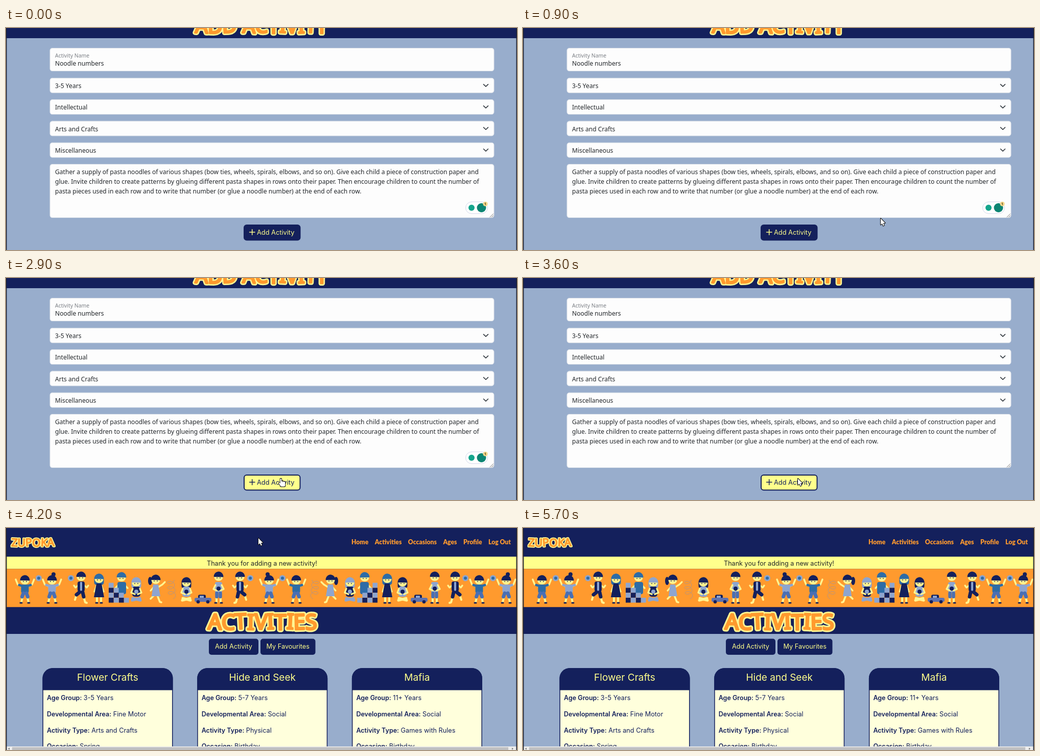
Write an HTML page with a canvas that moves like this. It is 1000 by 436 pixels and loops after 5.8 s.

```html
<!DOCTYPE html>
<html lang="en">
<head>
<meta charset="utf-8">
<title>Add activity</title>
<style>
  html, body { margin: 0; width: 100%; height: 100%; overflow: hidden; background: #98adcc; }
  canvas { display: block; width: 1000px; height: 436px; }
</style>
</head>
<body>
<canvas id="stage" width="1000" height="436"></canvas>
<script>
const ctx = document.getElementById('stage').getContext('2d');
const LOOP = 5800, HOVER = 1300, BUSY = 3500, LOADED = 3700;
const NAVY = '#14205c', SKY = '#98adcc', ORANGE = '#ff9a2e', YELLOW = '#ffff8c';
const PALE = '#ffffdc', BLUE = '#2d6ca6', MIST = '#8ea5cf', DENIM = '#496fb4', SKIN = '#fff490';
const INK = '#212529';
const FORM = '"Noto Sans", "Open Sans", sans-serif';
const ROUND = 'Inter, Roboto, sans-serif';

function rect(x, y, w, h, color) {
  ctx.fillStyle = color;
  ctx.fillRect(x, y, w, h);
}

function box(x, y, w, h, r, fill, edge, width = 1) {
  ctx.beginPath();
  ctx.roundRect(x, y, w, h, r);
  ctx.fillStyle = fill;
  ctx.fill();
  if (edge) {
    ctx.strokeStyle = edge;
    ctx.lineWidth = width;
    ctx.stroke();
  }
}

function disc(x, y, r, color, ry = r) {
  ctx.beginPath();
  ctx.ellipse(x, y, r, ry, 0, 0, Math.PI * 2);
  ctx.fillStyle = color;
  ctx.fill();
}

function line(points, color, width) {
  ctx.beginPath();
  points.forEach(([x, y]) => ctx.lineTo(x, y));
  ctx.strokeStyle = color;
  ctx.lineWidth = width;
  ctx.stroke();
}

function shape(points, color) {
  ctx.beginPath();
  points.forEach(([x, y]) => ctx.lineTo(x, y));
  ctx.closePath();
  ctx.fillStyle = color;
  ctx.fill();
}

function at(x, y, flip, draw) {
  ctx.save();
  ctx.translate(x, y);
  if (flip) ctx.scale(-1, 1);
  draw();
  ctx.restore();
}

// Draws a string and returns its width
function text(str, x, y, font, color, align = 'left') {
  ctx.font = font;
  ctx.fillStyle = color;
  ctx.textAlign = align;
  ctx.fillText(str, x, y);
  return ctx.measureText(str).width;
}

// Bouncy outlined lettering
function wild(str, cx, y, size, rim, fat) {
  ctx.font = `${size}px ${FORM}`;
  ctx.textAlign = 'center';
  ctx.fillStyle = ORANGE;
  const left = cx - ctx.measureText(str).width / 2;
  for (const [color, width] of [['#fff592', rim], [ORANGE, fat]]) {
    let x = left;
    [...str].forEach((ch, i) => {
      const w = ctx.measureText(ch).width;
      at(x + w / 2, y + Math.sin(i * 2.4) * size * 0.02, false, () => {
        ctx.rotate(Math.sin(i * 1.9 + 1) * 0.05);
        ctx.strokeStyle = color;
        ctx.lineWidth = width;
        ctx.strokeText(ch, 0, 0);
        ctx.fillText(ch, 0, 0);
      });
      x += w;
    });
  }
}

function page(top, bodyDraw) {
  rect(0, 0, 1000, 436, SKY);
  rect(0, 0, 1000, top, NAVY);
  bodyDraw();
  for (const x of [0, 998.5]) rect(x, 0, 1.5, 436, '#1b2030');
}

// ---------- form page ----------

function field(y, h) {
  box(86, y, 869, h, 4.5, '#fdfdfd', '#d3dae4');
}

function select(label, i) {
  const y = 98.3 + i * 42.3;
  field(y, 29);
  text(label, 96, y + 19.6, `12.1px ${FORM}`, INK);
  line([[934.5, y + 12.3], [939, y + 16.6], [943.5, y + 12.3]], '#343a40', 1.6);
}

function addButton(hover) {
  const ink = hover ? NAVY : YELLOW;
  box(466, 387, 109.5, 29.5, 5, hover ? YELLOW : NAVY, NAVY, 2);
  line([[476.5, 401], [487, 401]], ink, 1.5);
  line([[481.7, 395.7], [481.7, 406.3]], ink, 1.5);
  text('Add Activity', 491, 405.5, `12.8px ${ROUND}`, ink);
}

function helper() {
  box(899.5, 341.5, 43, 23, 11.5, '#fff', '#d3d8ea');
  disc(911, 353, 6, '#14a58c');
  disc(930.5, 353, 9, '#0d8573');
  disc(938, 345.5, 4.6, '#f6d98c');
  text('1', 938, 348.4, `bold 7.5px ${FORM}`, '#5a4a20', 'center');
}

function formPage(hover, help) {
  wild('ADD ACTIVITY', 499, 9.8, 39.4, 9, 3.5);
  field(39.5, 45);
  text('Activity Name', 96, 58, `10.4px ${FORM}`, '#7b7f85');
  text('Noodle numbers', 96, 73.6, `12.1px ${FORM}`, INK);
  ['3-5 Years', 'Intellectual', 'Arts and Crafts', 'Miscellaneous'].forEach(select);
  field(267.5, 105);
  [
    'Gather a supply of pasta noodles of various shapes (bow ties, wheels, spirals, elbows, and so on). Give each child a piece of construction paper and',
    'glue. Invite children to create patterns by glueing different pasta shapes in rows onto their paper. Then encourage children to count the number of',
    'pasta pieces used in each row and to write that number (or glue a noodle number) at the end of each row.'
  ].forEach((row, i) => text(row, 96, 287.3 + i * 19, `12.08px ${FORM}`, INK));
  for (const d of [6.5, 3]) line([[953.5 - d, 371.5], [953.5, 371.5 - d]], '#666', 0.9);
  if (help) helper();
  addButton(hover);
}

// ---------- children on the banner ----------

// A stroke and its mirror image
function pair(points, color, width) {
  line(points, color, width);
  line(points.map(([x, y]) => [-x, y]), color, width);
}

function head(y, hair, style) {
  if (style === 'long') box(-9.5, y - 8, 19, 20, [9, 9, 5, 5], hair);
  if (style === 'bun') disc(3, y - 12, 4, hair);
  if (style === 'tail') disc(-11, y + 2, 4, hair, 8);
  disc(0, y, 8.6, SKIN, 8);
  ctx.beginPath();
  ctx.arc(0, y - 1, 9.4, Math.PI * 0.95, Math.PI * 2.05);
  ctx.quadraticCurveTo(2, y, -9, y);
  ctx.fillStyle = hair;
  ctx.fill();
  for (const x of [-3, 3]) disc(x, y + 2, 0.9, NAVY);
}

function shoes(x) {
  pair([[x, 147], [x + 3, 147]], NAVY, 3);
}

function cheer(top, style) {
  pair([[6, 115], [14, 111], [18, 101]], SKIN, 3.4);
  pair([[5, 114], [11, 112]], top, 5);
  pair([[4, 132], [7, 146]], SKIN, 4);
  box(-7.5, 111, 15, 17, 4, top);
  pair([[3, 128], [5.5, 135]], DENIM, 7);
  shoes(6);
  head(103, NAVY, style);
}

function ball(x) {
  disc(x, 98.5, 6, MIST);
  disc(x, 98.5, 3, BLUE);
}

function boy() {
  cheer(BLUE);
  ball(27);
}

function girl() {
  cheer(MIST, 'bun');
}

function kicker() {
  pair([[5, 112], [11, 117], [14, 113]], SKIN, 3.4);
  line([[4, 132], [8, 146], [11, 147]], SKIN, 4);
  line([[-9, 131], [-12, 141]], SKIN, 4);
  box(-7, 105, 14, 20, 4, NAVY);
  rect(-2, 106, 4, 18, MIST);
  line([[-3, 126], [-9, 131]], NAVY, 7);
  line([[3, 126], [5, 135]], NAVY, 7);
  head(96, NAVY);
  ball(-20);
}

function dress() {
  pair([[4, 132], [4, 145]], SKIN, 4);
  head(100, BLUE, 'long');
  pair([[5, 113], [9, 125]], SKIN, 3.2);
  shape([[-5, 109], [5, 109], [10, 136], [-10, 136]], NAVY);
  shoes(3);
}

function builder() {
  pair([[6, 112], [12, 118]], SKIN, 3.5);
  box(-8, 106, 17, 24, 4, BLUE);
  head(97, BLUE);
  for (let col = 0; col < 4; col++) {
    for (let row = 0; row < 4 - col; row++) {
      rect(col * 10 - 25, 137 - row * 9.8, 9.6, 9.6, (row + col) % 2 ? MIST : NAVY);
    }
  }
}

function sitter(hair) {
  head(107, hair, 'long');
  box(-8, 115, 16, 20, 5, hair === NAVY ? MIST : NAVY);
  pair([[7, 119], [10, 127], [3, 130]], SKIN, 3.3);
  disc(0, 125, 4, hair);
  pair([[-7, 138], [8, 142]], hair === NAVY ? SKIN : MIST, 5);
}

function skipper() {
  line([[5, 116], [13, 111], [18, 106]], SKIN, 3.3);
  line([[-4, 116], [-10, 123]], SKIN, 3.3);
  line([[3, 132], [8, 145], [11, 146]], SKIN, 3.6);
  line([[-3, 132], [-10, 139]], SKIN, 3.6);
  shape([[-5, 111], [5, 111], [9, 134], [-8, 134]], MIST);
  head(102, NAVY, 'tail');
}

function rope() {
  const coil = Array.from({ length: 60 }, (_, i) => {
    const a = i * 0.34;
    return [Math.cos(a) * 7 + i * 0.05 - 2, 102 + i * 0.55 + Math.sin(a) * 5];
  });
  line(coil, '#b49484', 1);
}

function car() {
  box(-9, 131, 15, 9, 3, NAVY);
  rect(-6, 133, 8, 4, MIST);
  box(-16, 137, 33, 8, 3, '#5f72ae');
  for (const x of [-9, 10]) disc(x, 145, 3.3, NAVY);
}

function reader() {
  pair([[4, 130], [4, 146]], SKIN, 4);
  box(-7, 106, 14, 21, 4, MIST);
  pair([[6, 112], [10, 120], [3, 123]], SKIN, 3.4);
  pair([[3.5, 128], [3.5, 135]], DENIM, 6.5);
  disc(0, 119, 4, NAVY);
  shoes(4);
  head(96, NAVY);
}

const DUO = [[boy, 37], [girl, 90]];
const KICK = [[kicker, 147]];
const BUILD = [[dress, 182], [builder, 226], [() => sitter(MIST), 255], [skipper, 293], [rope, 324]];
const REST = [[() => sitter(NAVY), 353], [car, 385], [reader, 416]];

function place(group, shift, flip = false) {
  for (const [draw, x] of group) at(flip ? shift - x : shift + x, 0, flip, draw);
}

// The crowd repeats as shifted and mirrored groups
function banner() {
  rect(0, 80.3, 1000, 75, ORANGE);
  [DUO, KICK, BUILD, REST].forEach(group => place(group, 0));
  [DUO, KICK].forEach(group => place(group, 605, true));
  place(BUILD, 928, true);
  place(REST, 423);
  place(KICK, 1026, true);
  place(DUO, 889);
}

// ---------- activities page ----------

function nav() {
  let x = 988;
  for (const label of ['Log Out', 'Profile', 'Ages', 'Occasions', 'Activities', 'Home']) {
    x -= text(label, x, 31.5, '900 12.2px Lato, sans-serif', ORANGE, 'right') + 12.5;
  }
}

function card([title, ...values], i) {
  const x = 71.5 + i * 302.7, labels = ['Age Group:', 'Developmental Area:', 'Activity Type:', 'Occasion:'];
  box(x + 0.75, 275.75, 253.5, 190, [20, 20, 0, 0], PALE, NAVY, 1.5);
  box(x, 275, 255, 43.5, [20, 20, 0, 0], NAVY);
  text(title, x + 127.5, 300, `19px ${ROUND}`, YELLOW, 'center');
  labels.forEach((label, row) => {
    const y = 338.4 + row * 31.6;
    const w = text(label, x + 8.5, y, `600 12.5px ${ROUND}`, NAVY);
    text(values[row], x + 12 + w, y, `12.7px ${ROUND}`, NAVY);
  });
}

function pill(label, x, w) {
  box(x, 217.5, w, 31.5, 5, NAVY);
  text(label, x + w / 2, 237.4, `12.7px ${ROUND}`, YELLOW, 'center');
}

function scrollbar() {
  rect(0, 429, 1000, 7, '#ececec');
  rect(12, 430.5, 971, 5.5, '#bfc0c2');
  for (const [x, d] of [[5.5, 1.5], [991.5, -1.5]]) {
    shape([[x - d, 433.5], [x + d, 431.5], [x + d, 435.5]], '#777');
  }
}

function listPage() {
  wild('ZUPOKA', 52.5, 36, 21.4, 5, 1.5);
  nav();
  rect(0, 56.3, 1000, 24, YELLOW);
  text('Thank you for adding a new activity!', 501, 73.5, `12.6px ${ROUND}`, INK, 'center');
  banner();
  wild('ACTIVITIES', 501.5, 199, 42, 9.5, 3.5);
  pill('Add Activity', 397, 97);
  pill('My Favourites', 498, 107.5);
  [
    ['Flower Crafts', '3-5 Years', 'Fine Motor', 'Arts and Crafts', 'Spring'],
    ['Hide and Seek', '5-7 Years', 'Social', 'Physical', 'Birthday'],
    ['Mafia', '11+ Years', 'Social', 'Games with Rules', 'Birthday']
  ].forEach(card);
  scrollbar();
}

// ---------- pointer ----------

function arrow() {
  const tip = [[0, 0], [0, 12.5], [2.9, 9.9], [4.9, 14.6], [6.9, 13.7], [5, 9.2], [8.7, 9]];
  line([...tip, tip[0]], '#111', 2);
  shape(tip, '#fff');
}

function hand() {
  for (const [color, g] of [['#111', 0.9], ['#fff', 0]]) {
    line([[-3, 9], [0, 13]], color, 2.2 + g * 2);
    for (let i = 0; i < 4; i++) {
      const top = i ? 4.5 + i * 0.5 : 0;
      box(i * 2.4 - 1.3 - g, top - g, 2.4 + g * 2, 11 - top + g, 1.2, color);
    }
    box(-1.3 - g, 8 - g, 9.6 + g * 2, 7.5 + g * 2, 2.5, color);
  }
}

// Glides: start, end, x, y
const GLIDES = [
  [600, 900, 700, 374], [900, 1300, 538, 394], [3800, 4200, 494, 20], [5000, 5300, 494, -20]
];

function pointer(t) {
  return GLIDES.reduce(([px, py], [from, to, x, y]) => {
    const k = Math.min(1, Math.max(0, (t - from) / (to - from)));
    const e = k * k * (3 - 2 * k);
    return [px + (x - px) * e, py + (y - py) * e];
  }, [770, 445]);
}

function render(t) {
  const hover = t >= HOVER;
  if (t < LOADED) page(20, () => formPage(hover, t < BUSY));
  else page(208, listPage);
  at(...pointer(t), false, hover && t < BUSY ? hand : arrow);
}

ctx.lineJoin = ctx.lineCap = 'round';
const start = performance.now();
function tick(now) {
  const t = Math.max(0, now - start) % LOOP;
  render(Math.floor(t / 100) * 100);
  requestAnimationFrame(tick);
}
render(0);
requestAnimationFrame(tick);
</script>
</body>
</html>
```
